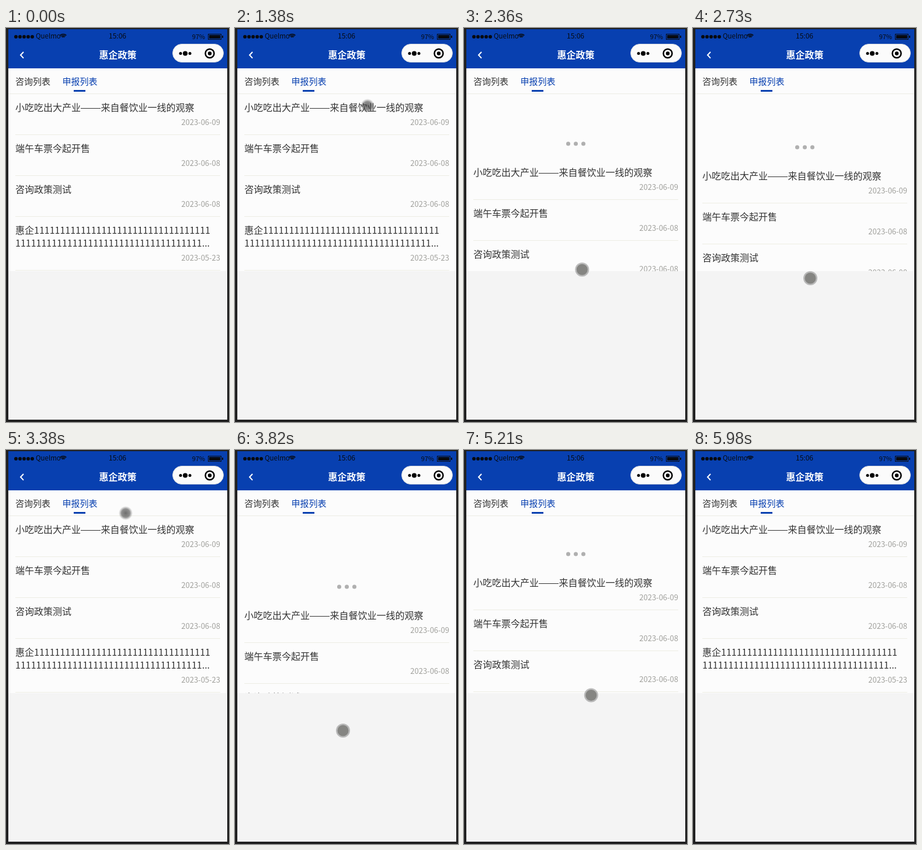
An HTML page with a canvas that plays this animation: 382 by 674 pixels, repeating every 6470 ms.

```html
<!DOCTYPE html>
<html lang="zh-CN">
<head>
<meta charset="utf-8">
<title>下拉刷新</title>
<style>
  html, body { margin: 0; width: 100%; height: 100%; overflow: hidden; background: #202020; }
  canvas { display: block; width: 382px; height: 674px; }
</style>
</head>
<body>
<canvas id="stage" width="382" height="674"></canvas>
<script>
const ctx = document.getElementById('stage').getContext('2d');
const SANS = '"Noto Sans CJK SC", "Noto Sans CJK", sans-serif';
const BLUE = '#0840b0', PAPER = '#fcfcfc', BACK = '#f4f4f4', BEZEL = '#202020';
const INK = '#333', BLACK = '#080a10', MUTED = '#a0a09c', RULE = '#ededE4';

const LOOP = 6470, ENTER = 570, LEAVE = 5980;
const PAUSE = 130, SPRING_BACK = 300, RESISTANCE = 0.395;
const entry = { x: 369, y: 492 }, exit = { x: 226, y: 690 };

// Each drag presses at `from`, slows into `to` at `low`, and lets go at `release`.
const drags = [
  { press: 1510, low: 2730, release: 2780, from: { x: 227, y: 133 }, to: { x: 201, y: 428 } },
  { press: 3440, low: 3820, release: 3880, from: { x: 205, y: 108 }, to: { x: 185, y: 480 } },
  { press: 4940, low: 5390, release: 5640, from: { x: 234, y: 189 }, to: { x: 216, y: 445 }, bow: 110 }
];

const items = [
  { date: '2023-06-09', lines: ['小吃吃出大产业——来自餐饮业一线的观察'] },
  { date: '2023-06-08', lines: ['端午车票今起开售'] },
  { date: '2023-06-08', lines: ['咨询政策测试'] },
  { date: '2023-05-23', lines: ['惠企' + '1'.repeat(34), '1'.repeat(36) + '...'] }
];

const progress = (t, a, b) => Math.min(1, Math.max(0, (t - a) / (b - a)));
const easeOut = k => 1 - (1 - k) ** 2.5;
const easeInOut = k => k * k * (3 - 2 * k);
const mix = (a, b, k) => ({ x: a.x + (b.x - a.x) * k, y: a.y + (b.y - a.y) * k });
const dragPoint = (d, t) => mix(d.from, d.to, easeOut(progress(t, d.press, d.low)));

function pointerAt(t) {
  let origin = entry, left = ENTER;
  for (const d of drags) {
    if (t < d.press) {
      const k = easeInOut(progress(t, left, d.press - PAUSE));
      const p = mix(origin, d.from, k);
      p.x += (d.bow || 0) * Math.sin(Math.PI * k);
      return p;
    }
    if (t < d.release) return { ...dragPoint(d, t), pressed: true };
    origin = d.to;
    left = d.release;
  }
  return mix(origin, exit, easeInOut(progress(t, left, LEAVE)));
}

function pullAt(t) {
  const d = drags.find(d => t >= d.press && t < d.release + SPRING_BACK);
  if (!d) return 0;
  const stretch = (dragPoint(d, t).y - d.from.y) * RESISTANCE;
  return stretch * (1 - easeOut(progress(t, d.release, d.release + SPRING_BACK)));
}

function rect(x, y, w, h, color) {
  ctx.fillStyle = color;
  ctx.fillRect(x, y, w, h);
}

function disc(x, y, r, color) {
  ctx.fillStyle = color;
  ctx.beginPath();
  ctx.arc(x, y, r, 0, Math.PI * 2);
  ctx.fill();
}

function arc(x, y, r, from, to, color, width) {
  ctx.strokeStyle = color;
  ctx.lineWidth = width;
  ctx.beginPath();
  ctx.arc(x, y, r, from, to);
  ctx.stroke();
}

function text(str, x, middle, size, color, align = 'left', weight = 400) {
  ctx.font = `${weight} ${size}px ${SANS}`;
  ctx.textAlign = align;
  ctx.fillStyle = color;
  ctx.fillText(str, x, Math.round(middle + size * 0.37));
}

// The double dash is one unbroken stroke, a little wider than two characters.
function title(str, x, y) {
  const [head, tail] = str.split('——');
  text(head, x, y, 16, INK);
  if (!tail) return;
  const dash = x + ctx.measureText(head).width;
  rect(dash, y + 1, 34, 1, INK);
  text(tail, dash + 34.5, y, 16, INK);
}

function statusBar() {
  for (let i = 0; i < 5; i++) disc(17 + i * 7, 15, 3, BLACK);
  text('Quelmo', 51, 14, 11.5, BLACK);
  for (let r = 3; r < 8; r += 2.3) arc(98, 18, r, -Math.PI * 0.75, -Math.PI * 0.25, BLACK, 1.5);
  text('15:06', 191, 14, 12, BLACK, 'center');
  text('97%', 341, 15, 11, BLACK, 'right');
  ctx.lineWidth = 1;
  ctx.strokeRect(346.5, 10.5, 22, 9);
  rect(348, 12, 19, 6, BLACK);
  rect(370, 13, 2, 4, BLACK);
}

function capsule() {
  ctx.beginPath();
  ctx.roundRect(285.5, 27.5, 87, 31, 15.5);
  ctx.fillStyle = '#fbfbfb';
  ctx.fill();
  ctx.strokeStyle = '#d4d8de';
  ctx.lineWidth = 1;
  ctx.stroke();
  for (let i = -1; i <= 1; i++) disc(307 + i * 8, 43.5, i ? 2.5 : 4, '#000');
  arc(349, 43.5, 7.5, 0, Math.PI * 2, '#000', 2.5);
  disc(349, 43.5, 3.2, '#000');
}

function header() {
  rect(4, 2, 375, 67, BLUE);
  statusBar();
  ctx.strokeStyle = '#fff';
  ctx.lineWidth = 2;
  ctx.beginPath();
  ctx.moveTo(30, 41);
  ctx.lineTo(25, 46.3);
  ctx.lineTo(30, 51.6);
  ctx.stroke();
  text('惠企政策', 191.5, 46, 16, '#fff', 'center', 700);
  capsule();
}

function tabs() {
  rect(4, 69, 375, 44, PAPER);
  text('咨询列表', 16, 91, 15, INK);
  text('申报列表', 96.5, 91, 15, BLUE);
  rect(116, 106, 20, 3, BLUE);
  rect(4, 112, 375, 1, RULE);
}

function list(pull) {
  ctx.save();
  ctx.beginPath();
  ctx.rect(4, 113, 375, 303);
  ctx.clip();
  rect(4, 113, 375, 303, PAPER);
  ctx.translate(0, Math.round(pull));
  for (let i = -1; i <= 1; i++) disc(191.5 + i * 13, 87, 3.5, '#b0b0b0');
  let y = 136;
  for (const { date, lines } of items) {
    lines.forEach((line, i) => title(line, 16, y + i * 22));
    y += (lines.length - 1) * 22;
    text(date, 367, y + 25, 13, MUTED, 'right');
    rect(16, y + 46, 351, 1, RULE);
    y += 70;
  }
  ctx.restore();
}

function pointer(t) {
  if (t < ENTER || t >= LEAVE) return;
  const { x, y, pressed } = pointerAt(t);
  if (pressed) {
    disc(x, y, 12, 'rgba(135,135,135,0.55)');
    disc(x, y, 9.5, '#858582');
    return;
  }
  const glow = ctx.createRadialGradient(x, y, 0, x, y, 12);
  glow.addColorStop(0, 'rgba(50,50,50,0.7)');
  glow.addColorStop(0.6, 'rgba(70,70,70,0.6)');
  glow.addColorStop(1, 'rgba(110,110,110,0)');
  disc(x, y, 12, glow);
}

function bezel() {
  rect(0, 0, 382, 2, BEZEL);
  rect(0, 670, 382, 4, BEZEL);
  rect(0, 0, 4, 674, BEZEL);
  rect(379, 0, 3, 674, BEZEL);
}

function draw(t) {
  rect(0, 0, 382, 674, BACK);
  list(pullAt(t));
  tabs();
  header();
  pointer(t);
  bezel();
}

const start = performance.now();
function tick() {
  draw((performance.now() - start) % LOOP);
  requestAnimationFrame(tick);
}
tick();
</script>
</body>
</html>
```
